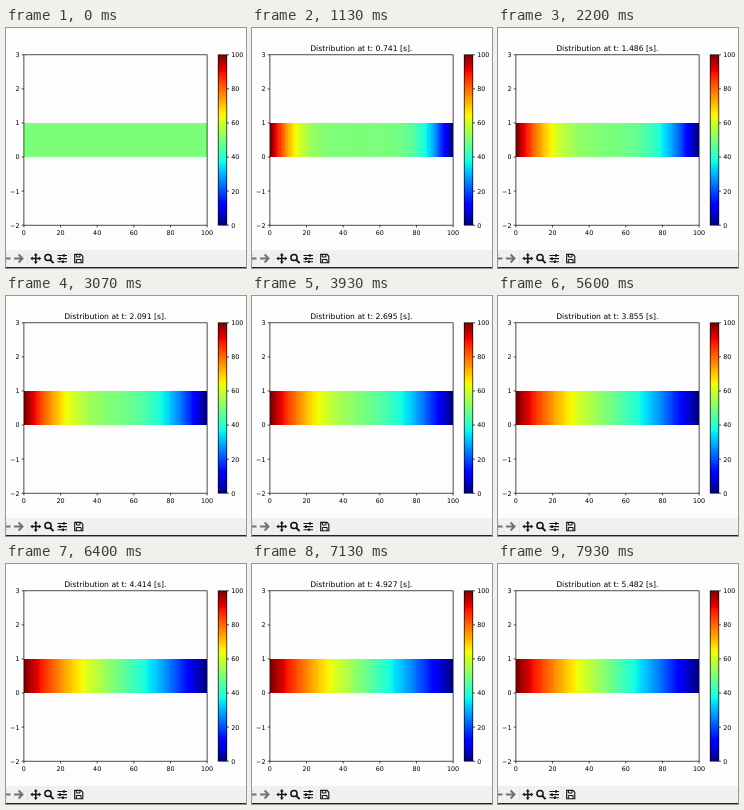
These frames come from a looping animation (240 px wide and 240 px high, 8 s). An HTML page:

```html
<!DOCTYPE html>
<html lang="en">
<head>
<meta charset="utf-8">
<title>Heat distribution</title>
<style>
  html, body { margin: 0; width: 100%; height: 100%; overflow: hidden; background: #fdfdfd; }
  svg { display: block; width: 100vw; height: 100vh; }
  text { font: 6.4px "DejaVu Sans", sans-serif; fill: #000; }
  #title { font-size: 7.68px; }
  #cells, #bar { shape-rendering: crispEdges; }
  .axis { fill: none; stroke: #000; stroke-width: .7; }
</style>
</head>
<body>
<svg id="stage" viewBox="0 0 240 240">
  <rect width="240" height="240" fill="#fdfdfd"/>
  <g id="cells"></g>
  <g id="bar"></g>
  <g id="axes"></g>
  <text id="title" x="109.3" y="22.9" text-anchor="middle"></text>

  <g id="toolbar">
    <rect y="222" width="240" height="18" fill="#f0f0f0"/>
    <rect y="239" width="240" height="1" fill="#222"/>
    <path d="M21.5 225v11M64.500 225v11" stroke="#ddd" stroke-width=".6"/>
    <g fill="none" stroke="#707070" stroke-width="1.8">
      <path d="M-4 230.5H4.5M0 226.5l-4 4 4 4"/>
      <path d="M8 230.5h8M12.6 226.5l4 4-4 4"/>
    </g>
    <g fill="none" stroke="#111" stroke-width="1.4">
      <path d="M29.8 227v7M26.3 230.5h7"/>
      <circle cx="42" cy="229.5" r="3.1" stroke-width="1.5"/>
      <path d="M44.3 231.8l3.3 3.3" stroke-width="1.9"/>
      <path d="M51.5 227.5h9.5M51.5 230.6h9.5M51.5 233.7h9.5" stroke-width="1.1"/>
      <path d="M58 226.2v2.6M54 229.3v2.6M57 232.4v2.6" stroke-width="1.8"/>
      <path d="M68.7 226.4h6.3l1.8 1.8v6.6h-8.1z" stroke-width="1.1"/>
      <path d="M70.4 226.5v2.5h3.6v-2.5M70.4 234.5v-3h4.7v3" stroke-width="1"/>
    </g>
    <path fill="#111" d="M29.8 225l2 2.4h-4zM29.8 236l2-2.4h-4zM24.3 230.5l2.4-2v4zM35.3 230.5l-2.4-2v4z"/>
  </g>
</svg>
<script>
const $ = id => document.getElementById(id);
const NODES = 100, FRAMES = 120, LOOP = 8000, DT = 1 / 220;
const plot = { x: 17.9, y: 26.8, w: 183.2, h: 170.4 };
const scale = { x: 212.2, w: 8.6 };
const px = v => plot.x + v / 100 * plot.w;
const py = v => plot.y + (3 - v) / 5 * plot.h;
const sy = v => plot.y + (1 - v / 100) * plot.h;

function add(parent, tag, attrs, text = '') {
  const el = document.createElementNS('http://www.w3.org/2000/svg', tag);
  for (const key in attrs) el.setAttribute(key, attrs[key]);
  el.textContent = text;
  return parent.appendChild(el);
}

// Piecewise linear colour map: red, green and blue as [position, level]
const jet = [
  [[0, 0], [.35, 0], [.66, 1], [.89, 1], [1, .5]],
  [[0, 0], [.125, 0], [.375, 1], [.64, 1], [.91, 0], [1, 0]],
  [[0, .5], [.11, 1], [.34, 1], [.65, 0], [1, 0]]
];
function colour(value) {
  const p = Math.min(1, Math.max(0, value / 100));
  const rgb = jet.map(stops => {
    const i = Math.max(1, stops.findIndex(s => s[0] >= p));
    const [a, u] = stops[i - 1], [b, v] = stops[i];
    return Math.round(255 * (u + (v - u) * (p - a) / (b - a)));
  });
  return `rgb(${rgb})`;
}

// Each cell reaches to the right end, so neighbours leave no seams
const cells = Array.from({ length: NODES }, (_, i) => add($('cells'), 'rect', {
  x: px(i), y: py(1), width: px(100) - px(i), height: py(0) - py(1)
}));
for (let i = 0; i < 128; i++) {
  const y = plot.y + i / 128 * plot.h;
  add($('bar'), 'rect', {
    x: scale.x, y, width: scale.w, height: plot.y + plot.h - y,
    fill: colour(100 * (1 - (i + .5) / 128))
  });
}

function drawAxes() {
  const g = $('axes'), right = scale.x + scale.w;
  const line = d => add(g, 'path', { class: 'axis', d });
  const label = (x, y, anchor, text) => add(g, 'text', { x, y, 'text-anchor': anchor }, text);
  add(g, 'rect', { class: 'axis', x: plot.x, y: plot.y, width: plot.w, height: plot.h });
  add(g, 'rect', { class: 'axis', x: scale.x, y: plot.y, width: scale.w, height: plot.h });
  for (let v = 0; v <= 100; v += 20) {
    line(`M${px(v)} ${plot.y + plot.h}v2.2`);
    label(px(v), plot.y + plot.h + 9.4, 'middle', v);
    line(`M${right} ${sy(v)}h2.2`);
    label(right + 4.4, sy(v) + 2.4, 'start', v);
  }
  for (let v = -2; v <= 3; v++) {
    line(`M${plot.x} ${py(v)}h-2.2`);
    label(plot.x - 4.4, py(v) + 2.4, 'end', String(v).replace('-', '\u2212'));
  }
}

// Explicit heat equation with unit spacing and both ends held fixed
function simulate() {
  let u = Array(NODES).fill(50), step = 0;
  const states = [{ u, title: '' }];
  u = u.slice();
  u[0] = 100;
  u[NODES - 1] = 0;
  for (let k = 1; k < FRAMES; k++) {
    const goal = Math.max(1, Math.round(163.3 + 10.226 * (k - 17)));
    for (; step < goal; step++) {
      const w = u;
      u = w.map((v, i) => i && i < NODES - 1 ? (w[i - 1] + w[i + 1]) / 2 : v);
    }
    states.push({ u, title: `Distribution at t: ${(step * DT).toFixed(3)} [s].` });
  }
  return states;
}

drawAxes();
const states = simulate();
let shown = -1;
function render(time) {
  const k = Math.floor((time % LOOP + 3.4) / (LOOP / FRAMES)) % FRAMES;
  if (k === shown) return;
  shown = k;
  $('title').textContent = states[k].title;
  states[k].u.forEach((v, i) => cells[i].setAttribute('fill', colour(v)));
}

const start = performance.now();
function tick() {
  render(performance.now() - start);
  requestAnimationFrame(tick);
}
tick();
</script>
</body>
</html>
```
